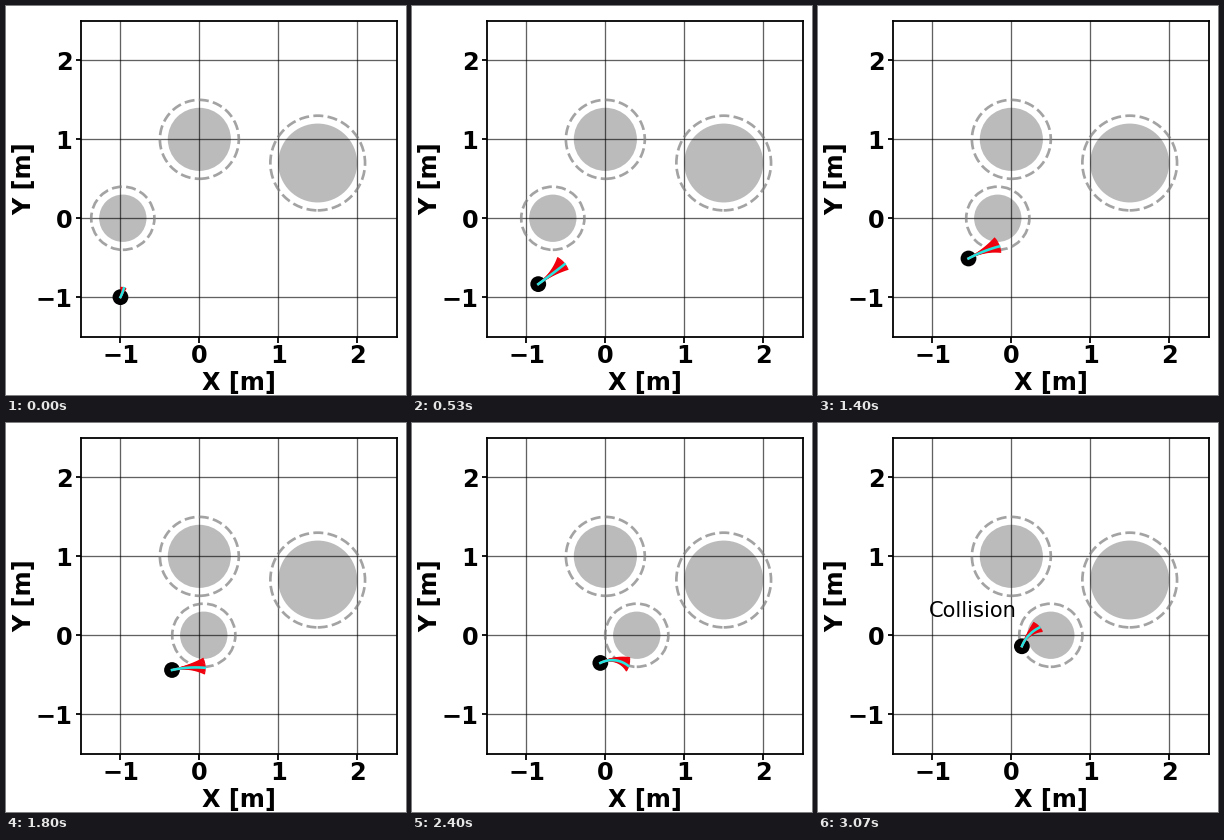
Animation of 400 by 389 pixels, one loop 3.14 s. Source, as a matplotlib script:

```python
import numpy as np
import matplotlib.pyplot as plt
from matplotlib.animation import FuncAnimation
from matplotlib.patches import Circle

W, H, DPI = 400, 389, 100
LOOP_MS, TICK_MS = 3140, 20
STEPS, STEP_MS = 47, 1000 / 15     # the simulation runs at 15 steps per second
SCALE = 78.9                       # pixels per metre
PT = 72 / DPI                      # points per pixel
HORIZON = 12                       # steps looked ahead
FONT = dict(family="DejaVu Sans", weight="bold", size=24 * PT)

# Heading of the robot and turn of its best path, in degrees
KNOTS = [0, 8, 13, 22, 28, 36, 46]
steps = np.arange(STEPS)
heading = np.radians(np.interp(steps, KNOTS, [64, 36, 62, 24, 10, 27, 68]))
turn = np.radians(np.interp(steps, KNOTS, [10, 2, -25, -12, -18, -66, -42]))

# Speed up from near rest, cruise, then slow down gently
speed = np.minimum(0.8 + 0.45 * steps, 2.75) - 0.03 * np.maximum(steps - 27, 0)
speed /= SCALE
velocity = speed * np.exp(1j * heading)
track = -1 - 1j + np.append(0, np.cumsum((velocity[1:] + velocity[:-1]) / 2))

SPREAD = np.radians(np.linspace(-20, 32, 12))


def arc(n, bend):
    """Path ahead of the robot that turns evenly by the given angle."""
    t = (np.arange(16) + 0.5) / 16
    moves = HORIZON * speed[n] / 16 * np.exp(1j * (heading[n] + bend * t))
    path = track[n] + np.append(0, np.cumsum(moves))
    return path.real, path.imag


def add_obstacle(x, y, r):
    body = Circle((x, y), r, fc="gray", alpha=0.53, lw=0, zorder=1)
    margin = Circle((x, y), r + 0.1, fill=False, ec="gray", alpha=0.72,
                    lw=2.7 * PT, ls="--", zorder=2.2)
    ax.add_patch(body)
    ax.add_patch(margin)
    return body, margin


fig = plt.figure(figsize=(W / DPI, H / DPI), dpi=DPI, facecolor="white")
ax = fig.add_axes([75 / W, 1 - 330.6 / H, 4 * SCALE / W, 4 * SCALE / H])
ax.set(xlim=(-1.5, 2.5), ylim=(-1.5, 2.5),
       xticks=range(-1, 3), yticks=range(-1, 3))
ax.grid(color="black", alpha=0.62, lw=1.3 * PT)
ax.tick_params(length=5.5 * PT, width=1.8 * PT)
ax.tick_params(axis="x", pad=1.5 * PT)
ax.tick_params(axis="y", pad=3 * PT)
for label in ax.get_xticklabels() + ax.get_yticklabels():
    label.set(**FONT)
for spine in ax.spines.values():
    spine.set_linewidth(1.8 * PT)
fig.text(233 / W, 1 - 384.5 / H, "X [m]", ha="center", va="baseline", **FONT)
fig.text(25 / W, 1 - 173 / H, "Y [m]", ha="center", va="baseline",
         rotation=90, rotation_mode="anchor", **FONT)

add_obstacle(0, 1, 0.4)
add_obstacle(1.5, 0.7, 0.5)
mover = add_obstacle(-0.97, 0, 0.3)

robot = Circle((-1, -1), 0.1, fc="black", lw=0, zorder=4)
ax.add_patch(robot)
samples = [ax.plot([], [], color="#f0000c", lw=1.7 * PT, zorder=5)[0]
           for _ in SPREAD]
best, = ax.plot([], [], color="#26e5e0", lw=2.6 * PT, zorder=6)
notice = fig.text(111 / W, 1 - 194.5 / H, "Collision", family="DejaVu Sans",
                  size=21 * PT, va="baseline")


def update(tick):
    n = min(int((tick + 1) * TICK_MS / STEP_MS), STEPS - 1)
    for ring in mover:
        ring.center = (min(-0.97 + 0.038 * n, 0.5), 0)
    robot.center = (track[n].real, track[n].imag)
    best.set_data(*arc(n, turn[n]))
    for extra, line in zip(SPREAD, samples):
        line.set_data(*arc(n, turn[n] + extra))
    notice.set_visible(n == STEPS - 1)
    return [*mover, robot, *samples, best, notice]


anim = FuncAnimation(fig, update, frames=LOOP_MS // TICK_MS, interval=TICK_MS,
                     repeat=True, repeat_delay=0)
plt.show()
```
